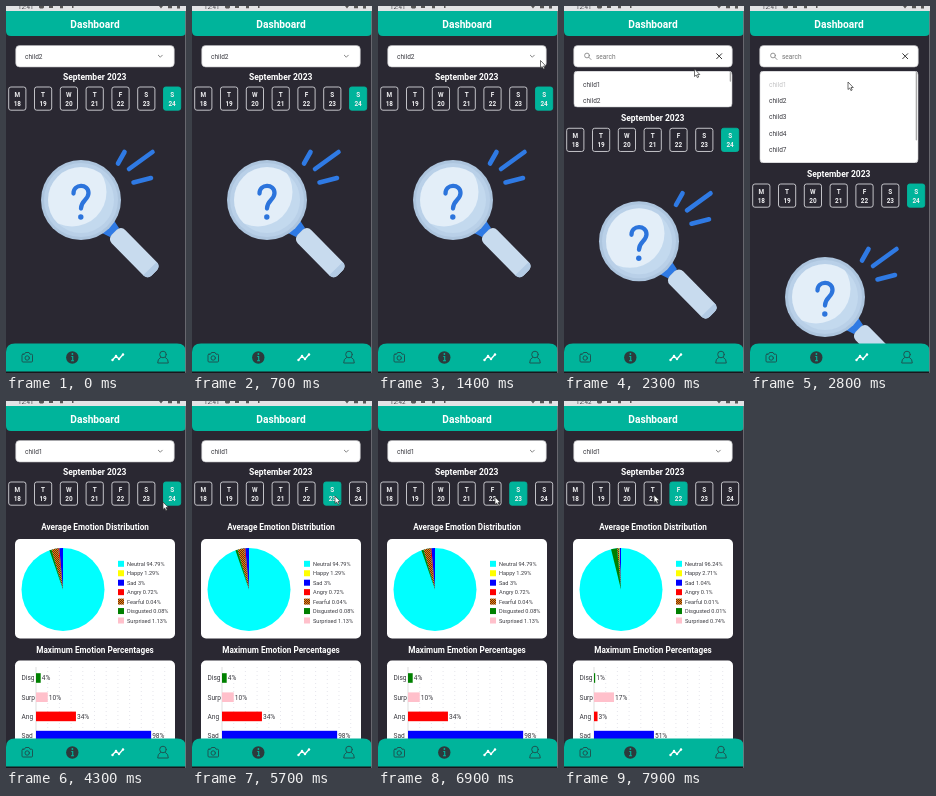
Animation, 180 px wide and 367 px high, one loop 8 s. Source, as an HTML page:

```html
<!DOCTYPE html>
<html lang="en">
<head>
<meta charset="utf-8">
<title>Dashboard</title>
<style>
  html, body { margin: 0; width: 100%; height: 100%; overflow: hidden; background: #2a2832; }
  #stage { display: block; width: 100vw; height: 100vh; }
  text { font-family: Roboto, "Open Sans", sans-serif; fill: #fff; }
  .head { font-size: 8.2px; font-weight: 600; text-anchor: middle; }
  .dark { fill: #3a3a40; }
  .field { font-size: 6.5px; }
  .day { font-size: 6.4px; font-weight: 700; text-anchor: middle; fill: #f0f0f2; }
  .line { fill: none; stroke-linecap: round; stroke-linejoin: round; }
</style>
</head>
<body>
<svg id="stage" viewBox="0 0 180 367" preserveAspectRatio="none">
  <defs>
    <pattern id="hatch" width="2" height="2" patternUnits="userSpaceOnUse">
      <rect width="2" height="2" fill="#e8870c"/>
      <path d="M0 0h1v1h-1zM1 1h1v1h-1z" fill="#6b2a12"/>
    </pattern>
    <clipPath id="lens"><circle cx="75" cy="194" r="33"/></clipPath>
  </defs>
  <rect width="180" height="367" fill="#2a2832"/>

  <g id="page">
    <text class="head" x="88.700" y="74" style="font-size:8.500px">September 2023</text>
    <g id="days"></g>

    <g id="empty">
      <path class="line" d="M112 157.500L118.500 146M123 163L146.500 146M127.500 176.500L145 172" stroke="#2f7ae4" stroke-width="4.600"/>
      <path d="M94 226L107 213L113 222L104 231Z" fill="#2f7ae4"/>
      <g transform="translate(104 222) rotate(45.500)">
        <rect x="6" y="-9.500" width="57" height="19" rx="6" fill="#c8dbee"/>
        <path d="M57 -9.500Q63 -9.500 63 -3.500V3.500Q63 9.500 57 9.500Z" fill="#b3cbe4"/>
      </g>
      <circle cx="75" cy="194" r="40" fill="#adc5de"/>
      <circle cx="75" cy="194" r="37" fill="#b9d0e8"/>
      <circle cx="75" cy="194" r="33" fill="#c3d9ee"/>
      <circle cx="66" cy="186" r="34.500" fill="#e3eef8" clip-path="url(#lens)"/>
      <path class="line" d="M67.500 187.500C67.500 177.500 82.500 177.500 82.500 187C82.500 194 75 194 75 202.500" stroke="#2c74dc" stroke-width="4.300"/>
      <circle cx="74.800" cy="211" r="2.700" fill="#2c74dc"/>
    </g>

    <g id="charts">
      <text class="head" x="89" y="129.300">Average Emotion Distribution</text>
      <rect x="9" y="138" width="160" height="99.500" rx="5" fill="#fff"/>
      <g id="pie"></g>
      <g id="legend"></g>
      <text class="head" x="89" y="252.300">Maximum Emotion Percentages</text>
      <rect x="9" y="259.500" width="160" height="108" rx="5" fill="#fff"/>
      <g id="grid"></g>
      <g id="bars"></g>
    </g>
  </g>

  <rect x="9.700" y="39.500" width="158.600" height="21.500" rx="4" fill="#fff" stroke="#b5b5b9" stroke-width=".6"/>
  <g id="closed">
    <text id="picked" class="field dark" x="19" y="52.500"></text>
    <path class="line" d="M152.300 49.200L154.300 51.200L156.300 49.200" stroke="#777" stroke-width=".9"/>
  </g>
  <g id="search">
    <g class="line" stroke="#888" stroke-width=".9">
      <circle cx="23" cy="49.500" r="2.400"/><path d="M24.800 51.300L27 53.500"/>
    </g>
    <text class="field" x="32" y="52.600" style="fill:#777">search</text>
    <path class="line" d="M152.700 47.700L157.700 52.700M157.700 47.700L152.700 52.700" stroke="#333" stroke-width="1"/>
  </g>
  <svg id="list" x="9.700" y="65" width="158.600" overflow="hidden"></svg>

  <rect width="180" height="12" fill="#e2e3e5"/>
  <g class="dark">
    <text id="clock" class="dark" x="12" y="2.600" font-size="6.200"></text>
    <path d="M33 0h5v1.500l-1 1h-3l-1-1zM43 0h4v2h-4zM54 0h3v2.200h-3zM66 0h1.500v2h-1.500zM153 0h4l-2 2.500zM162 0h4v2.300h-4zM171 0h3v2.600h-3z" fill="#555"/>
  </g>
  <path d="M0 5H180V25Q180 30 175 30H5Q0 30 0 25Z" fill="#00b49b"/>
  <text class="head" x="89" y="21.700" style="font-size:10.200px;font-weight:700">Dashboard</text>

  <path d="M0 366V346Q0 337.500 9 337.500H171Q180 337.500 180 346V366Z" fill="#00b49b"/>
  <rect y="365.500" width="180" height="1.500" fill="#17161b"/>
  <rect x="179.200" y="5" width=".8" height="362" fill="#77777d"/>
  <g class="line" stroke="#1d5552" stroke-width="1">
    <path d="M17 348.200H18.500L19.500 346.500H23L24 348.200H25.500Q26.500 348.200 26.500 349.200V355Q26.500 356 25.500 356H17Q16 356 16 355V349.200Q16 348.200 17 348.200Z"/>
    <circle cx="21.200" cy="352" r="2.200"/>
    <circle cx="157" cy="348.500" r="3.300"/>
    <path d="M154.500 351.500Q151.500 353 151.700 357H162.300Q162.500 353 159.500 351.500"/>
  </g>
  <circle cx="66.300" cy="351.500" r="6.200" fill="#2c3a3c"/>
  <path d="M65.300 350.500H66.700V354.500M65 354.700H68" stroke="#00b49b" stroke-width="1.100" fill="none"/>
  <circle cx="66.400" cy="348" r=".9" fill="#00b49b"/>
  <path class="line" d="M106.500 354L110 350L113 353L117 348.500" stroke="#fff" stroke-width="1.300"/>
  <g fill="#fff">
    <circle cx="106.500" cy="354" r="1.200"/><circle cx="110" cy="350" r="1.200"/>
    <circle cx="113" cy="353" r="1.200"/><circle cx="117" cy="348.500" r="1.200"/>
  </g>

  <path id="cursor" d="M0 0V7.500L1.700 6L2.900 8.600L4.200 8L3 5.500H5.300Z" fill="#fff" stroke="#333" stroke-width=".7"/>
</svg>
<script>
const LOOP = 8000, STEP = 100, LIST_H = 92;
const GREEN = '#00b49b', HATCH = 'url(#hatch)';
const $ = id => document.getElementById(id);
const show = (id, on) => $(id).setAttribute('display', on ? 'inline' : 'none');
const clamp = p => Math.max(0, Math.min(1, p));
const ease = p => p < .5 ? 2 * p * p : 1 - 2 * (1 - p) * (1 - p);

const emotions = [
  ['Neutral', '#0ff'], ['Happy', '#ff0'], ['Sad', '#00f'], ['Angry', '#f00'],
  ['Fearful', HATCH], ['Disgusted', '#008000'], ['Surprised', '#ffc0cb']
];
// slices run anticlockwise from the top of the pie
const reports = [
  {
    share: ['94.79', '1.29', '3', '0.72', '0.04', '0.08', '1.13'],
    slices: [['#00f', 1.4], ['#f00', .5], [HATCH, 2.6], ['#008000', .8]],
    bars: [4, 10, 34, 98]
  },
  {
    share: ['96.24', '2.71', '1.04', '0.1', '0.01', '0.01', '0.74'],
    slices: [['#00f', .6], ['#ff0', .25], [HATCH, .7], ['#008000', 2.3]],
    bars: [1, 17, 3, 51]
  }
];
const rows = [['Disg', '#008000'], ['Surp', '#ffc0cb'], ['Ang', '#f00'], ['Sad', '#00f']];

// time, x, y
const path = [
  [900, 184, 92], [1400, 162.5, 54.5], [1900, 162.5, 54.5], [2300, 130.5, 63], [2800, 98, 76],
  [4000, 98, 76], [4300, 157, 101], [4800, 148, 97], [5400, 143, 95],
  [6100, 143, 95], [6900, 117, 96], [7200, 116, 96], [7500, 90, 94], [8000, 90, 94]
];

function drawDays(chosen) {
  $('days').innerHTML = [...'MTWTFSS'].map((d, i) => {
    const x = 2.7 + i * 25.8, on = i === chosen;
    return `<rect x="${x}" y="81" width="17.200" height="23.200" rx="2.200"
      fill="${on ? GREEN : 'none'}" stroke="${on ? GREEN : '#d4d4d8'}" stroke-width=".9"/>
      <text class="day" x="${x + 8.6}" y="90.600">${d}</text>
      <text class="day" x="${x + 8.6}" y="100.100">${18 + i}</text>`;
  }).join('');
}

function drawPie({ share, slices }) {
  const cx = 57, cy = 188.5, r = 41.5;
  const at = a => `${cx - r * Math.sin(a)} ${cy - r * Math.cos(a)}`;
  let a = 0;
  $('pie').innerHTML = `<circle cx="${cx}" cy="${cy}" r="${r}" fill="#0ff"/>` +
    slices.map(([fill, pct]) => {
      const from = at(a);
      a += pct / 100 * 2 * Math.PI;
      return `<path d="M${cx} ${cy}L${from}A${r} ${r} 0 0 0 ${at(a)}Z" fill="${fill}"/>`;
    }).join('');
  $('legend').innerHTML = emotions.map(([name, fill], i) => {
    const y = 162.8 + i * 9.45;
    return `<rect x="112" y="${y - 3}" width="6" height="6" fill="${fill}"/>
      <text class="dark" x="121" y="${y + 2}" font-size="5.600">${name} ${share[i]}%</text>`;
  }).join('');
}

function drawBars(values) {
  $('bars').innerHTML = rows.map(([name, fill], i) => {
    const y = 277 + i * 19.2, w = values[i] * 1.175;
    return `<rect x="30" y="${y - 4.8}" width="${w}" height="9.600" fill="${fill}"/>
      <text class="dark" x="15.500" y="${y + 2.4}" font-size="6.600">${name}</text>
      <text class="dark" x="${31 + w}" y="${y + 2.4}" font-size="6.600">${Math.round(values[i])}%</text>`;
  }).join('');
}

function drawGrid() {
  let s = '<path d="M30 266V340" stroke="#ccc" stroke-width=".6"/>';
  for (let x = 41.7; x < 160; x += 11.7)
    s += `<path d="M${x} 266V340" stroke="#dcdce4" stroke-width=".7" stroke-dasharray="1 3"/>`;
  $('grid').innerHTML = s;
}

function drawList(h, pressed) {
  const list = $('list');
  list.setAttribute('height', h);
  list.innerHTML = `<rect width="158.600" height="${h}" rx="4" fill="#fff" stroke="#b5b5b9"/>` +
    [1, 2, 3, 4, 7].map((n, i) =>
      `<text class="field dark" x="9.300" y="${15.8 + i * 16.3}" opacity="${pressed && !i ? .3 : 1}">child${n}</text>`
    ).join('') +
    `<rect x="156" y="1" width="1.400" height="${Math.max(0, h * h / 122 - 1)}" rx=".7" fill="#aaa"/>`;
}

function moveCursor(t) {
  show('cursor', t >= path[0][0]);
  const i = path.findIndex(k => k[0] > t);
  if (i < 1) return;
  const [t0, x0, y0] = path[i - 1], [t1, x1, y1] = path[i];
  const p = (t - t0) / (t1 - t0);
  $('cursor').setAttribute('transform', `translate(${x0 + (x1 - x0) * p} ${y0 + (y1 - y0) * p})`);
}

function draw(t) {
  const open = t >= 2000 && t < 3600;
  const h = LIST_H * (t < 3000 ? ease(clamp((t - 2078) / 500)) : 1 - ease(clamp((t - 3000) / 550)));
  show('closed', !open);
  show('search', open);
  show('list', open && h > 1);
  drawList(open ? h : 0, t >= 2700);
  $('page').setAttribute('transform', `translate(0 ${open ? h + 5 : 0})`);
  $('picked').textContent = t < 3800 ? 'child2' : 'child1';
  $('clock').textContent = t < 6100 ? '12:41' : '12:42';

  show('empty', t < 3900);
  show('charts', t >= 3900);
  drawDays(t < 5500 ? 6 : t < 7200 ? 5 : 4);
  const [a, b] = reports, mix = clamp((t - 7700) / 200);
  drawPie(mix ? b : a);
  drawBars(a.bars.map((v, i) => v + (b.bars[i] - v) * mix));
  moveCursor(t);
}

drawGrid();
const start = performance.now();
let last = -1;
function tick() {
  const t = Math.floor((performance.now() - start) % LOOP / STEP) * STEP;
  if (t !== last) draw(last = t);
  requestAnimationFrame(tick);
}
tick();
</script>
</body>
</html>
```
